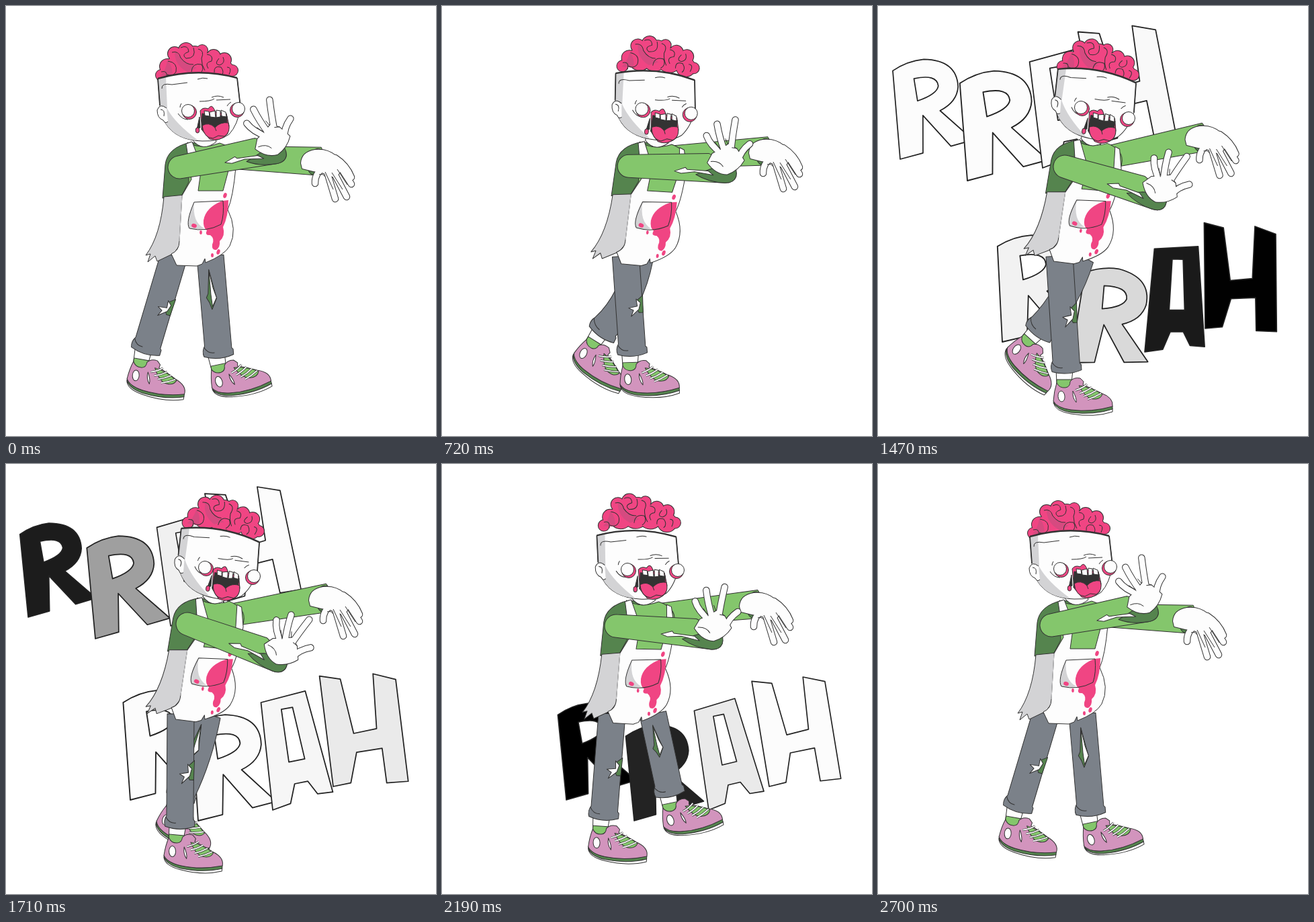
Animation of 640 by 640 pixels, one loop 2.73 s. Source, as an HTML page with a canvas:

```html
<!DOCTYPE html>
<html>
<head>
<meta charset="utf-8">
<title>Walking zombie</title>
<style>
html, body { margin: 0; width: 100%; height: 100%; overflow: hidden; background: #fff; }
canvas { display: block; width: 100vw; height: 100vh; }
</style>
</head>
<body>
<canvas id="stage" width="640" height="640"></canvas>
<script>
const c = document.getElementById('stage').getContext('2d');
const INK = '#333', PINK = '#f04583', GREEN = '#84c66c', MOSS = '#55844e';
const WHITE = '#fdfdfd', SHADE = '#d3d3d5', DENIM = '#7b8189', SHOE = '#d294bd';
const LOOP = 2730, CYCLE = 2700, STEP = 30;
const KEYS = [0, 330, 1050, 1470, 1710, 2190];

// Smooth cyclic curve through one value per key time
function cyclic(values, t) {
  const n = KEYS.length;
  const time = i => KEYS[(i + n) % n] + CYCLE * Math.floor(i / n);
  const value = i => values[(i + n) % n];
  const slope = i => (value(i + 1) - value(i - 1)) / (time(i + 1) - time(i - 1));
  let i = n - 1;
  while (KEYS[i] > t) i--;
  const d = time(i + 1) - time(i), u = (t - time(i)) / d, v = 1 - u;
  return v * v * (1 + 2 * u) * value(i) + u * u * (3 - 2 * u) * value(i + 1)
    + d * u * v * (v * slope(i) - u * slope(i + 1));
}
const track = (...rows) => t => rows.map(row => cyclic(row, t));

// Straight interpolation through [position, value] pairs
function ramp(points, p) {
  let i = 1;
  while (i < points.length - 1 && points[i][0] < p) i++;
  const [a, x] = points[i - 1], [b, y] = points[i];
  return x + (y - x) * Math.min(1, Math.max(0, (p - a) / (b - a)));
}

const torsoPose = track([275, 282, 292, 284, 275, 276], [370, 370, 368, 366, 366, 370], [0, 1.5, 5, 5, 5, 1.2]);
const headPose = track([290, 301, 321, 314, 307, 292], [200, 200, 196, 196, 198, 200], [0, 1, 9, 10.5, 10.5, 1.5]);
const brainShift = track([0, 4, 3, 1, 3, 5], [0, -3, -8, 0, -5, -10]);
const leftEye = track([271, 285, 305, 302, 296, 276], [156, 155, 152, 151, 154, 157]);
const rightEye = track([346, 361, 376, 373, 369, 351], [153, 156, 163, 167, 167, 158]);
const mouthPose = track([311, 321, 338, 334, 328, 314], [172, 174, 178, 177, 176, 174], [0, 2, 8, 8, 8, 1]);
const armPose = track([258, 268, 284, 278, 270, 259], [240, 239, 238, 239, 238, 241], [-10, -7, 10, 18, 21, 6]);
const handTurn = track([0, 5, 28, 43, 45, 20]);
const farHand = track([462, 470, 486, 480.5, 474, 466], [231, 231, 203, 196, 200, 209]);
const nearHip = track([250, 260, 281, 270, 260, 253]);
const nearFoot = track([202, 237, 305, 277, 254, 236], [523, 528, 530, 553, 549, 536], [10, 3, -4, 0, 5, 4]);
const farHip = track([304, 305, 290, 303, 300, 314]);
const farFoot = track([315, 268, 207, 228, 252, 338], [531, 529, 472, 493, 505, 502], [-12, 5, 50, 42, 22, -12]);
const farKnee = track([0, 0, 15, 7, 4, 0]);

function draw(d, fill, stroke = INK, width = 1) {
  const path = new Path2D(d);
  if (fill) { c.fillStyle = fill; c.fill(path, 'evenodd'); }
  if (stroke) { c.strokeStyle = stroke; c.lineWidth = width; c.stroke(path); }
}
const line = (d, color = INK, width = 1) => draw(d, null, color, width);

function oval(x, y, rx, ry, fill, stroke, turn = 0) {
  c.beginPath();
  c.ellipse(x, y, rx, ry, turn, 0, 7);
  c.fillStyle = fill;
  c.fill();
  if (stroke) { c.strokeStyle = stroke; c.lineWidth = 1; c.stroke(); }
}

function at([x, y, turn = 0], paint, px = 0, py = 0) {
  c.save();
  c.translate(x, y);
  c.rotate(turn * Math.PI / 180);
  c.translate(-px, -py);
  paint();
  c.restore();
}

const SHAPES = {
  R: 'M0,0L-9,-139Q14,-154 40,-156Q92,-154 93,-112Q91,-88 64,-75L115,-28L80,-19L37,-68L36,-9Z M24,-126Q60,-133 62,-114Q60,-101 29,-91Z',
  A: 'M0,0L-19,-163L48,-181L91,-28L68,-25L53,-44L33,-40L27,-10Z M12,-153L29,-156L48,-78L24,-73Z',
  H: 'M0,0L-24,-169L8,-165L30,-82L65,-90L58,-174L93,-166L115,-10L82,-7L74,-60L35,-53L27,-6Z'
};
// shape, x, y, size, tilt, entry time, exit time
const LETTERS = [
  ['R', 33, 228, 1, 0, 800, 1470], ['R', 133, 260, 1.07, 0, 890, 1560],
  ['A', 245, 241, .97, 0, 980, 1690], ['H', 330, 204, 1, -3, 1070, 1780],
  ['R', 185, 500, 1.05, 0, 1190, 1900], ['R', 286, 531, 1.02, 0, 1280, 1955],
  ['A', 397, 515, 1, 0, 1370, 2160], ['H', 487, 480, 1, 0, 1460, 2220]
];
const FADE_IN = [[0, 0], [60, .02], [100, .1], [150, .7], [190, .85], [280, .95], [450, .99]];
const FADE_OUT = [[0, 1], [150, .63], [240, .11], [290, 0]];
const GROW = [[0, .92], [250, .97], [500, 1], [730, .93], [1000, .87]];
const SWING = [[0, 7], [100, 12], [170, 17], [250, 1], [400, 0], [900, -2]];

function letter([shape, x, y, size, tilt, enter, leave], t) {
  if (t < enter || t > leave + 320) return;
  const age = t - enter;
  const level = Math.round(255 * ramp(FADE_IN, age) * ramp(FADE_OUT, t - leave));
  at([x, y, tilt + ramp(SWING, age)], () => {
    const s = size * ramp(GROW, age);
    c.scale(s, s);
    draw(SHAPES[shape], `rgb(${level},${level},${level})`, '#222', 1.8);
  });
}

function foot() {
  draw('M-12,-12L13,-12L11,8L-11,8Z', WHITE);
  draw('M-11,3L11,3L11,20L-11,20Z', GREEN);
  draw('M-16,37Q-12,47 8,51Q40,56 72,46L72,51Q45,60 10,54Q-14,50 -16,37Z', WHITE);
  draw('M-16,35Q-8,46 10,48Q45,52 72,42L72,47Q45,56 10,52Q-13,48 -16,35Z', MOSS);
  draw('M-11,8Q-7,16 2,15Q9,14 9,6Q14,-1 24,1L29,6L28,11Q40,15 55,23Q74,30 72,43Q40,52 10,48Q-11,45 -16,35Q-15,20 -11,8Z', SHOE);
  draw('M22,12Q40,14 57,25Q54,33 43,32Q32,31 22,12Z', GREEN);
  for (let i = 0; i < 4; i++) {
    const lace = `M${17 + i * 6},${19 + i * 4.5}Q${27 + i * 6},${16 + i * 4.5} ${34 + i * 7},${10 + i * 4.5}`;
    line(lace, INK, 3);
    line(lace, WHITE, 1.7);
  }
  draw('M13,20Q12,30 18,37Q19,31 13,20Z', WHITE);
  oval(-4, 28, 5, 8, WHITE, INK, -.1);
}

function leg(hipX, pose, bend, tear) {
  at(pose, foot);
  const [x, y, turn] = pose, r = turn * Math.PI / 180;
  const dx = x + 4 * Math.cos(r) + 10 * Math.sin(r) - hipX;
  const dy = y + 4 * Math.sin(r) - 10 * Math.cos(r) - 372;
  const len = Math.hypot(dx, dy), half = len / 2, shin = Math.hypot(bend, half);
  const hx = 22 * half / shin, hy = 22 * bend / shin;
  at([hipX, 372, Math.atan2(-dx, dy) * 180 / Math.PI], () => {
    draw(`M-20,0Q${2 * bend - 20},${half} ${-hx + 2},${len - hy - 16}Q${-hx - 3},${len - hy - 8} ${-hx},${len - hy}`
      + `Q0,${len + 8} ${hx},${len + hy}L${hx},${len + hy - 8}L${hx - 2},${len + hy - 10}Q${2 * bend + 20},${half} 20,0Z`, DENIM);
    line(`M${-hx + 1},${len - hy - 14}Q${-hx + 6},${len - hy - 4} ${-hx + 16},${len - 5}`);
    c.scale(1, len / 150);
    tear();
  });
}

function nearTear() {
  draw('M21,62L11,70L15,77L10,80L14,88L20,88Z', MOSS);
  draw('M11,67L12,78L-1,80L6,84L2,93L14,83L17,73Z', WHITE);
}
function farTear() {
  draw('M-4,20L1,48L4,64L-4,80L-7,70L-11,62L-8,56Z', MOSS);
  draw('M-4,22L0,48L4,63L-3,76L-4,58Z', WHITE);
}

function hand(palm, fingers) {
  c.lineCap = 'round';
  for (const finger of fingers) line(finger, INK, 10.5);
  draw(palm, WHITE, INK, 2);
  for (const finger of fingers) line(finger, WHITE, 8.5);
  draw(palm, WHITE, null);
  c.lineCap = 'butt';
}

function farArm(t) {
  const [sx] = headPose(t), [wx, wy] = farHand(t);
  const angle = Math.atan2(wy - 224, wx - sx - 30), len = Math.hypot(wy - 224, wx - sx - 30);
  at([sx + 30, 224, angle * 180 / Math.PI], () => {
    draw(`M0,-16L${len + 6},-21Q${len + 14},-10 ${len + 2},21L0,17Z`, GREEN);
    oval(len, 1, 13, 20, MOSS, INK, .2);
  });
  at([wx, wy], () => {
    hand('M439,234Q440,217 460,214Q478,212 491,223L503,239L491,256L470,248Q455,246 441,242Z',
      ['M473,240Q459,250 460,264', 'M477,244L490,287', 'M486,244L507,284', 'M494,234L514,265', 'M490,226Q507,237 514,255']);
    line('M475,247L487,273M485,248L501,273M493,243L508,266M466,251Q472,249 475,254');
  }, 462, 231);
}

function torso() {
  draw('M274,203Q240,211 237,236L233,286L264,283L290,255L290,205Z', MOSS);
  draw('M270,203Q290,215 318,204Q344,212 342,232L335,278L262,281L272,262Z', GREEN);
  draw('M278,200Q293,218 313,202L310,194L281,194Z', WHITE);
  draw('M235,284Q230,342 208,371L215,369L211,381L222,372L225,380L250,368L270,340L266,281Z', SHADE);
  draw('M268,205L277,202L291,239L286,275L323,275L331,245L330,208L337,211L342,240Q338,285 330,303'
    + 'Q345,333 333,357Q325,371 297,382L296,376L292,384L284,387L254,386L246,369Q258,364 258,350L262,282L276,258Z', WHITE);
  line('M258,350L262,282', SHADE);
  draw('M280,292Q268,318 272,330Q280,334 295,331Q277,322 280,292Z', SHADE, null);
  draw('M331,289L322,290Q297,300 294,319Q293,330 299,334Q295,342 304,341Q311,346 307,355Q306,364 313,363'
    + 'Q319,359 318,350Q327,342 323,329Q331,313 331,289Z', PINK, null);
  oval(326, 282, 2.6, 4, PINK, null, .3);
  oval(280, 327, 4, 3, PINK, null, .4);
  oval(290, 337, 1.8, 3, PINK);
  oval(316, 366, 2.5, 4, PINK, null, .3);
  oval(307, 371, 2, 3, PINK);
  line('M280,292L323,290Q325,310 320,325Q298,337 273,331Q267,322 280,292Z');
}

const LOBES = [
  [231, 103, 8], [240, 90, 11], [251, 71, 10], [256, 90, 17], [268, 66, 11], [281, 72, 12], [278, 88, 18],
  [292, 66, 8], [300, 88, 18], [309, 75, 10], [325, 80, 10], [325, 96, 14], [337, 96, 8]
];
function brain() {
  for (const [x, y, r] of LOBES) oval(x, y, r + 1, r + 1, INK);
  for (const [x, y, r] of LOBES) oval(x, y, r, r, PINK);
  draw('M240,81Q250,92 247,104L230,104Q238,96 240,81ZM251,66Q264,85 284,92L270,98Q250,88 251,66Z', '#d64a80', null);
  line('M231,98Q241,95 239,107M241,82Q256,84 253,98Q248,106 240,102M247,69Q257,66 260,77Q268,88 279,87'
    + 'M260,62Q271,57 272,68Q260,72 268,78Q284,78 279,62M276,98Q277,84 291,87Q296,95 288,101'
    + 'M286,64Q296,66 291,78Q291,88 296,96M299,72Q309,73 306,82Q295,84 301,93'
    + 'M317,78Q309,87 318,88Q327,85 323,76M310,99Q309,88 320,91Q326,99 320,104M329,91Q337,91 332,102');
}

function eye([x, y], side) {
  oval(x + side * 2, y + 2, 10.5, 10.5, PINK, INK);
  oval(x, y, 9.5, 9.5, WHITE, INK);
}

function mouth() {
  draw('M289,156Q293,150 301,153Q306,145 310,154L312,158L328,160L332,178L330,190Q318,203 303,198L292,185Z', PINK);
  draw('M292,160L329,164L329,180L291,184Z', '#333');
  draw('M295,156L302,157L303,164L296,163ZM303,158L311,156L312,166L304,165ZM313,155L319,156L319,165L313,166ZM320,155L327,158L328,165L321,164Z', WHITE);
  draw('M292,178Q302,172 311,181Q319,172 331,174Q335,188 325,194L316,193L308,197Q294,196 292,178Z', PINK);
  line('M311,181L313,186');
  draw('M288,165L284,184L289,181Z', '#333');
  oval(285, 185, 2.8, 4, PINK, INK);
}

function head(t) {
  const pose = headPose(t), [bx, by] = brainShift(t);
  at(pose, () => {
    at([bx, by], brain);
    draw('M226,108Q285,91 344,107L349,151Q345,177 332,191Q317,202 292,201Q253,200 237,174Q230,163 229,148Z', WHITE);
    draw('M227,109L238,106L240,153Q252,175 286,200Q253,199 237,174Q230,163 229,148Z', SHADE, null);
    draw('M239,152Q229,144 225,155Q225,167 234,170Q237,176 241,172', WHITE);
    line('M230,154Q237,154 235,164');
    line('M226,108Q285,91 344,107', INK, 2.4);
    line('M226,108L229,148M344,107L349,151', INK, 1.8);
    line('M232,123Q231,114 247,117L270,114M285,109Q293,106 300,108M288,142Q305,142 310,138M306,136Q315,132 324,136M313,140L334,139'
      + 'M256,160Q262,169 271,169M261,145Q259,148 259,151M329,149Q331,145 335,143');
  }, 290, 200);
  eye(leftEye(t), 1);
  eye(rightEye(t), -1);
  at(mouthPose(t), mouth, 311, 172);
}

function frontArm(t) {
  const pose = armPose(t);
  at(pose, () => {
    draw('M0,-17L118,-23L150,-10Q162,0 160,10Q157,20 143,20L0,17A17,17 0 0 1 0,-17Z', GREEN);
    draw('M100,9L122,0L155,-8Q162,0 160,10Q157,20 143,20Q119,20 100,9Z', MOSS);
    draw('M68,5L84,-1L87,2L118,3L126,9L98,5L78,8Z', WHITE);
    at([140, -3, handTurn(t)[0] - pose[2]], () => {
      hand('M372,197L382,187L391,176L405,180L420,193Q416,210 402,220Q386,225 369,212Z',
        ['M385,193Q365,186 356,174', 'M388,188Q375,171 366,153', 'M397,184Q393,164 390,139', 'M412,196Q411,181 421,167']);
      line('M382,188L371,180M390,177L384,170M397,180L405,179M373,209Q385,204 393,211');
    }, 393, 212);
  });
}

function frame(now) {
  const t = Math.floor(now % LOOP / STEP) * STEP, pose = t % CYCLE;
  c.setTransform(1, 0, 0, 1, 0, 0);
  c.fillStyle = '#fff';
  c.fillRect(0, 0, 640, 640);
  c.lineJoin = 'round';
  for (const item of LETTERS) letter(item, t);
  farArm(pose);
  leg(farHip(pose)[0], farFoot(pose), farKnee(pose)[0], farTear);
  leg(nearHip(pose)[0], nearFoot(pose), 0, nearTear);
  at(torsoPose(pose), torso, 275, 370);
  head(pose);
  frontArm(pose);
  requestAnimationFrame(frame);
}
requestAnimationFrame(frame);
</script>
</body>
</html>
```
